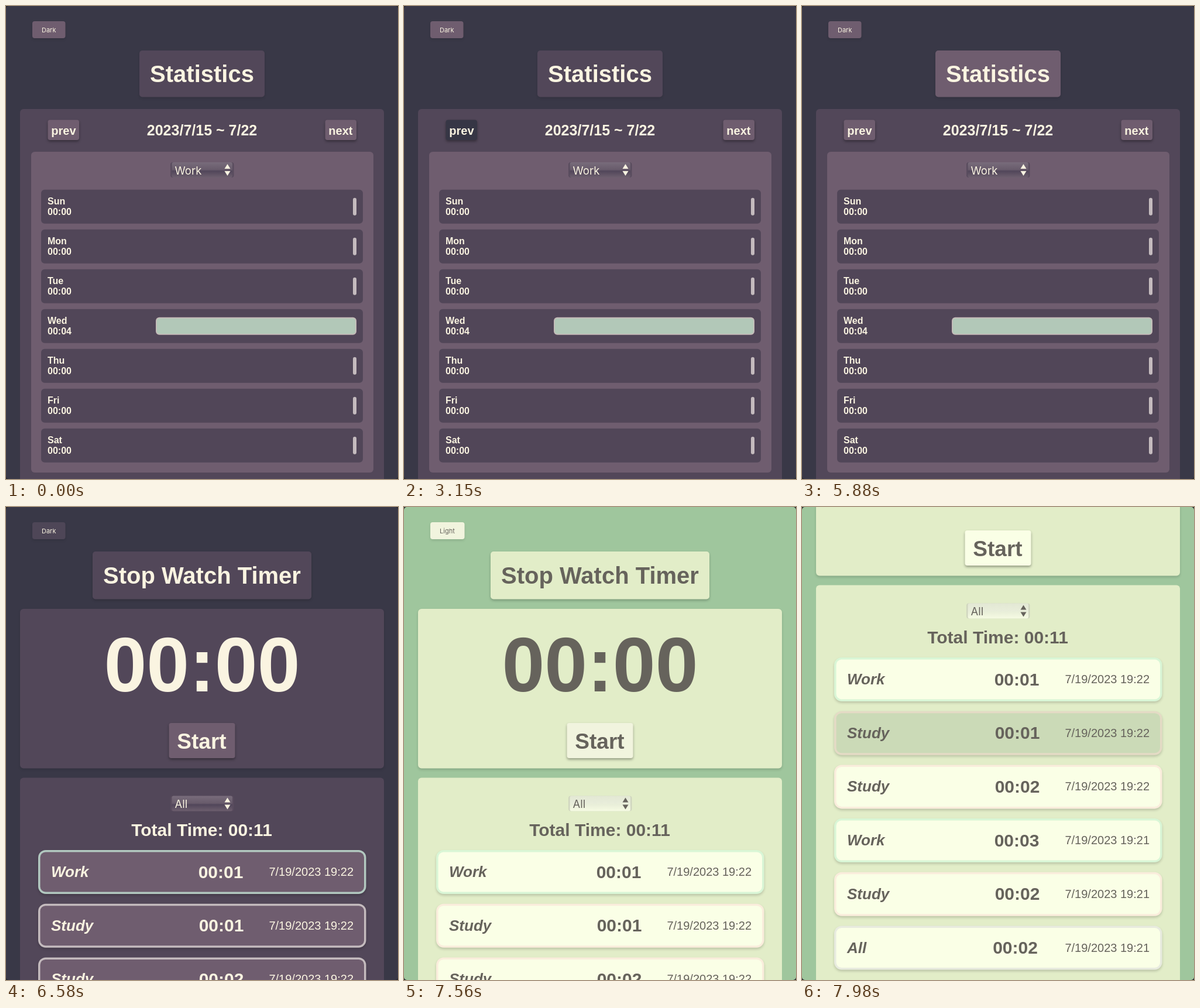
An HTML page with a canvas that plays this animation: 670 by 808 pixels, repeating every 8 s.

```html
<!DOCTYPE html>
<html lang="en">
<head>
<meta charset="utf-8">
<title>Stop Watch Timer</title>
<style>
  html, body { margin: 0; width: 100%; height: 100%; overflow: hidden; background: #26262c; }
  canvas { display: block; border-radius: 5px; }
</style>
</head>
<body>
<canvas id="stage" width="670" height="808"></canvas>
<script>
const ctx = document.getElementById('stage').getContext('2d');
const LOOP = 8000, FADE = 400;
const SANS = '"Liberation Sans", Arial, sans-serif';
const UI = 'Inter, Roboto, sans-serif';

const DARK = { bg: '#393847', panel: '#524759', box: '#6f5d6f', text: '#faf4e1', button: '#6f5d6f', press: '#363645' };
const LIGHT = { bg: '#9fc69d', panel: '#e2edc8', box: '#faffe6', text: '#66635c', button: '#f1f4de', press: '#9fc69d' };

// Times of the pointer's actions, in ms
const NEXT_HOVERS = [[1520, 2350], [4800, 5300]];
const PREV_HOVERS = [[2530, 4290]];
const TITLE_HOVERS = [[5400, 6060]];
const TOGGLE_HOVERS = [[6220, 6480]];
const PAGE_AT = 5950, THEME_AT = 6615, TOGGLE_FADE_AT = 6730;
const WEEKS = [
  [5180, '2023/7/15 ~ 7/22', true],
  [3780, '2023/7/8 ~ 7/15', false],
  [2940, '2023/7/15 ~ 7/22', true],
  [2240, '2023/7/22 ~ 7/29', false],
  [0, '2023/7/15 ~ 7/22', true],
];

const DAYS = ['Sun', 'Mon', 'Tue', 'Wed', 'Thu', 'Fri', 'Sat'];
const RECORDS = [
  ['Work', '00:01', '19:22'], ['Study', '00:01', '19:22'], ['Study', '00:02', '19:22'],
  ['Work', '00:03', '19:21'], ['Study', '00:02', '19:21'], ['All', '00:02', '19:21'],
];
const CATEGORY = {
  Work: { dark: '#b2c8c0', light: '#d9f6d6', middle: 367 },
  Study: { dark: '#c4bbbe', light: '#faeddc', middle: 368 },
  All: { dark: '#b5b0b8', light: '#e8ebdf', middle: 364.5 },
};

const clamp = v => Math.min(1, Math.max(0, v));

// CSS "ease", cubic-bezier(.25, .1, .25, 1)
function ease(x) {
  x = clamp(x);
  if (x === 0 || x === 1) return x;
  const curve = (a, b, u) => 3 * a * u * (1 - u) ** 2 + 3 * b * u * u * (1 - u) + u ** 3;
  let low = 0, high = 1;
  for (let i = 0; i < 18; i++) {
    const mid = (low + high) / 2;
    if (curve(.25, .25, mid) < x) low = mid; else high = mid;
  }
  return curve(.1, 1, low);
}

const fade = (t, start) => ease((t - start) / FADE);
const hover = (t, spans) => spans.reduce((sum, [on, off]) => sum + fade(t, on) - fade(t, off), 0);

function mix(a, b, f) {
  const part = (hex, i) => parseInt(hex.slice(i, i + 2), 16);
  return '#' + [1, 3, 5].map(i =>
    Math.round(part(a, i) + (part(b, i) - part(a, i)) * f).toString(16).padStart(2, '0')).join('');
}

function box(x, y, w, h, r, fill, shadow = 0) {
  ctx.save();
  if (shadow) {
    ctx.shadowColor = `rgba(0,0,0,${shadow})`;
    ctx.shadowOffsetY = 2.5;
    ctx.shadowBlur = 4;
  }
  ctx.fillStyle = fill;
  ctx.beginPath();
  ctx.roundRect(x, y, w, h, r);
  ctx.fill();
  ctx.restore();
}

function label(str, x, y, font, color, align = 'left') {
  ctx.font = font;
  ctx.fillStyle = color;
  ctx.textAlign = align;
  ctx.fillText(str, x, y);
}

const bold = size => `bold ${size}px ${SANS}`;

function triangle(x, y, h, color) {
  ctx.fillStyle = color;
  ctx.beginPath();
  ctx.moveTo(x - 5, y);
  ctx.lineTo(x + 5, y);
  ctx.lineTo(x, y + h);
  ctx.fill();
}

function select(str, y, color, stops, edge) {
  const fill = ctx.createLinearGradient(0, y, 0, y + 26);
  [0, .48, .58, 1].forEach((at, i) => fill.addColorStop(at, stops[i]));
  box(281, y, 108.5, 26, 4, edge);
  box(283.5, y, 103.5, 26, 3, fill);
  label(str, 288.5, y + 20.5, `18.5px ${UI}`, color);
  triangle(378.5, y + 11, -8, color);
  triangle(378.5, y + 15, 8, color);
}

function toggle(str, width, fill, color) {
  box(45, 26, width, 29, 4, fill, .1);
  label(str, 61, 45, `11px ${UI}`, color);
}

function statistics(t) {
  const [, range, worked] = WEEKS.find(([start]) => t >= start);
  const { panel, box: inner, text, button, press } = DARK;

  box(228, 76, 214, 79.5, 5, mix(panel, inner, hover(t, TITLE_HOVERS)), .1);
  label('Statistics', 335, 129.5, bold(40), text, 'center');

  box(24, 176, 622, 700, 6, panel);
  box(71.5, 194.5, 53.5, 34.5, 4, mix(button, press, hover(t, PREV_HOVERS)), .35);
  label('prev', 77.3, 219.5, bold(20), text);
  box(545.5, 194.5, 53.5, 34.5, 4, mix(button, press, hover(t, NEXT_HOVERS)), .35);
  label('next', 551.3, 219.5, bold(20), text);
  label(range, 335, 220.5, bold(25), text, 'center');

  box(43, 249, 585, 548, 6, inner);
  select('Work', 267, text, ['#786c7b', '#685b6b', '#51465a', '#6d5f6e'], '#594c5e');

  DAYS.forEach((day, i) => {
    const y = 313.7 + 68 * i;
    const filled = worked && day === 'Wed';
    box(60, y, 550, 58, 6, '#514658');
    label(day, 71, y + 25.3, bold(16), text);
    label(filled ? '00:04' : '00:00', 71, y + 43.3, bold(16), text);
    if (filled) {
      box(256, y + 14, 343, 30, 6, '#c6bbb9');
      box(257.7, y + 15.7, 339.6, 26.6, 4.5, '#b2c8b8');
    } else {
      box(593, y + 14, 6, 30, 3, '#c4bbbe');
    }
  });
}

function stopwatch(t, theme, scroll) {
  const change = fade(t, THEME_AT);
  const between = key => mix(DARK[key], LIGHT[key], change);
  const { panel, text } = theme;
  const isLight = theme === LIGHT;
  const shade = isLight ? .22 : .15;

  const title = mix(between('panel'), DARK.box, hover(t, TITLE_HOVERS));
  box(148, 76, 374, 81.5, 5, title, shade);
  label('Stop Watch Timer', 335, 131, bold(40), text, 'center');

  box(24, 174, 622, 272.5, 6, panel, shade * .7);
  label('00:00', 335, 314.5, bold(131), text, 'center');
  const start = mix(between('button'), LIGHT.box, isLight ? clamp((t - 7560) / 300) : 0);
  box(278.5, 369, 113, 60, 4, start, .35);
  label('Start', 334.5, 412.5, bold(37), text, 'center');

  box(24, 462.5, 622, 800, 6, panel);
  const stops = [['#786c7b', '#e3e8d4'], ['#685b6b', '#e8edda'], ['#51465a', '#e9efd9'], ['#6d5f6e', '#f6fbe3']];
  select('All', 493.5, text, stops.map(([a, b]) => mix(a, b, change)), mix('#594c5e', '#d0d6bf', change));
  label('Total Time: 00:11', 334.5, 562, bold(30), text, 'center');

  RECORDS.forEach(([name, time, clock], i) => {
    const y = 586 + 91.7 * i;
    const { dark, light, middle } = CATEGORY[name];
    const lit = i === 1 ? fade(t, 7720) : 0;
    box(55, y, 560.5, 75, 13, mix(mix(dark, light, change), '#e2d9c3', lit), .18);
    box(58.5, y + 3.5, 553.5, 68, 9, mix(between('box'), '#c7d7b3', lit));
    label(name, 77, y + 46, `italic ${bold(26)}`, text);
    label(time, middle, y + 47.5, bold(30), text, 'center');
    label(`7/19/2023 ${clock}`, 594, y + 44, `20px ${SANS}`, text, 'right');
  });
}

function draw(now) {
  const t = now % LOOP;
  const theme = t < THEME_AT ? DARK : LIGHT;
  const s = clamp((t - 7565) / 415);
  const scroll = 329 * (1 - (1 - s) ** 2 * (1 + 2 * s));

  ctx.fillStyle = theme.bg;
  ctx.fillRect(0, 0, 670, 808);
  ctx.save();
  ctx.translate(0, -scroll);
  if (theme === DARK) {
    toggle('Dark', 56.5, mix(DARK.button, DARK.press, hover(t, TOGGLE_HOVERS)), DARK.text);
  } else {
    const f = fade(t, TOGGLE_FADE_AT);
    toggle('Light', 58.5, mix('#695b6b', LIGHT.button, f), mix(DARK.text, LIGHT.text, f));
  }
  if (t < PAGE_AT) statistics(t); else stopwatch(t, theme);
  ctx.restore();
}

const begin = performance.now();
function tick() {
  draw(performance.now() - begin);
  requestAnimationFrame(tick);
}
tick();
</script>
</body>
</html>
```
